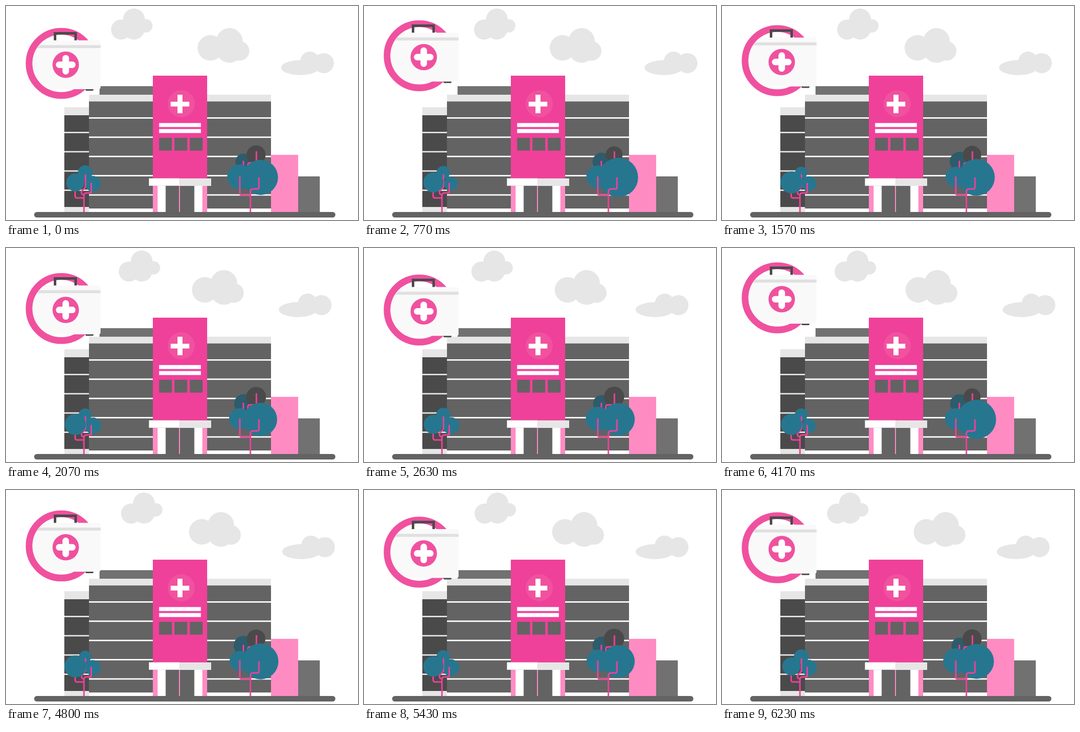
These frames come from a looping animation (700x427 px, 6260 ms). An HTML page:

```html
<!DOCTYPE html>
<html lang="en">
<head>
<meta charset="utf-8">
<title>Hospital</title>
<style>
html, body { margin: 0; width: 100%; height: 100%; overflow: hidden; background: #fff; }
svg { display: block; width: 100%; height: 100%; }
.pink { fill: #ef4199; }
.rose { fill: #ff8bc3; }
.grey { fill: #636363; }
.dark { fill: #4a4a4a; }
.mid { fill: #717171; }
.light { fill: #e6e6e6; }
.white { fill: #fff; }
.teal { fill: #27768f; }
.stem { fill: none; stroke: #ef4199; stroke-width: 3; stroke-linecap: round; }
</style>
</head>
<body>
<svg viewBox="0 0 700 427">
  <defs>
    <clipPath id="body">
      <circle cx="110" cy="114.5" r="57.5"/>
      <rect x="110" y="40" width="90" height="140"/>
    </clipPath>
  </defs>

  <g class="light">
    <g id="cloud1">
      <circle cx="229" cy="47" r="20"/><circle cx="254.5" cy="26.7" r="21.7"/>
      <circle cx="254.5" cy="45.5" r="21.5"/><circle cx="278" cy="39.5" r="13.3"/>
    </g>
    <g id="cloud2">
      <circle cx="406.5" cy="83.5" r="25.5"/><circle cx="444.5" cy="70.3" r="26.3"/>
      <circle cx="444.5" cy="87" r="26.3"/><circle cx="464.5" cy="89.7" r="19.5"/>
    </g>
    <g id="cloud3">
      <ellipse cx="585" cy="123" rx="38" ry="15"/>
      <circle cx="604.5" cy="110.3" r="19.3"/><circle cx="632" cy="114" r="20"/>
    </g>
  </g>

  <!-- left wing and main block -->
  <path class="light" d="M116 202h49v209h-49z"/>
  <path class="dark" d="M116 218h49v183h-49z"/>
  <path class="mid" d="M186 160h106v18H186z"/>
  <path class="grey" d="M165 190h362v214H165z"/>
  <path class="light" d="M165 177h362v13.500H165z"/>
  <g id="floors"></g>
  <path class="rose" d="M527 297h54v114h-54z"/>
  <path class="mid" d="M581 340h43v71h-43z"/>

  <!-- tower and entrance -->
  <path class="pink" d="M292 139h108v205H292z"/>
  <circle cx="348.500" cy="195" r="27" fill="#f1519f"/>
  <path class="white" d="M341 177h10v37h-10zM327.500 191h37v9.500h-37zM304.500 233.500h83v8h-83zM304.500 245.500h83v8h-83z"/>
  <path class="grey" d="M304.500 263h25.500v25.500h-25.500zM335 263h25.500v25.500h-25.500zM365.500 263h25.500v25.500h-25.500z"/>
  <path class="rose" d="M292 358h108v53H292z"/>
  <path class="white" d="M301.500 358h89v53h-89z"/>
  <path class="grey" d="M317.500 358h57v53h-57z"/>
  <path class="rose" d="M344 358h2v53h-2z"/>
  <path d="M284.500 344h61v14.500h-61z" fill="#fff" stroke="#ddd" stroke-width=".7"/>
  <path class="light" d="M345.500 344h62.500v15h-62.500z"/>

  <!-- small tree -->
  <circle id="smallTop" class="teal" cx="157.500" cy="332.500"/>
  <circle id="smallRight" class="teal" cx="172.800" cy="354.500"/>
  <path class="stem" d="M155 411V383M137.500 360V379q0 4 4 4H155M158 337V359C158 367 150 365 150 372q0 4 5 5M155 385V378q0-5 5-5h7q2.500 0 2.500-3V354"/>
  <circle id="smallLeft" class="teal" cx="138" cy="352"/>

  <!-- big tree -->
  <circle id="bigBack" cx="472.300" cy="310.500" fill="#2d5c6c"/>
  <circle id="bigDark" class="dark" cx="497.300" cy="297"/>
  <path class="stem" d="M498 291V310q0 3-3 3H485q-4 0-4 4V330M472 310V330"/>
  <circle id="bigLeft" class="teal" cx="465" cy="341"/>
  <circle id="bigRight" class="teal" cx="506" cy="342"/>
  <path class="stem" d="M486 411V371q0-6 5-6h9q3 0 3-3V343M465 341V373q0 4 4 4H486"/>

  <rect class="grey" x="56" y="411" width="599" height="11" rx="5.500"/>

  <!-- first aid kit -->
  <g id="kit">
    <circle cx="110" cy="114.500" r="64" fill="none" stroke="#f0519f" stroke-width="13.500"/>
    <path d="M97.500 69V54.500h41V69" fill="none" stroke="#4a4a4a" stroke-width="5"/>
    <path class="dark" d="M158 165h16v2q0 2-2 2h-12q-2 0-2-2z"/>
    <g clip-path="url(#body)">
      <rect x="50" y="68.500" width="138" height="97.500" rx="4" fill="#f9f9f9"/>
      <path d="M50 78h138v6H50z" fill="#e0e0e0"/>
    </g>
    <circle cx="118.800" cy="117.200" r="26.300" fill="#f0519f"/>
    <path d="M118.800 104.200v26M105.800 117.200h26" stroke="#fff" stroke-width="13" stroke-linecap="round"/>
  </g>
</svg>
<script>
const PERIOD = 3130;
const $ = id => document.getElementById(id);
const shift = (id, x, y) => $(id).setAttribute("transform", `translate(${x} ${y})`);
const radius = (id, r) => $(id).setAttribute("r", r);

const floor = (x, y, w) => `<rect class="white" x="${x}" y="${y}" width="${w}" height="2.800"/>`;
let floors = "";
for (let i = 0; i < 5; i++) {
  floors += floor(165, 222 + i * 38.4, 362);
  if (i < 4) floors += floor(116, 251 + i * 38.4, 49).replace("white", "light");
}
$("floors").innerHTML = floors;

function draw(now) {
  const a = now / PERIOD * 2 * Math.PI;
  const slow = Math.cos(a);
  const late = Math.sin(a - 0.22);

  shift("cloud1", 10 - 10 * slow, 0);
  shift("cloud2", 9.4 * Math.cos(a + 0.32) - 9, 0);
  shift("cloud3", 2 + 9.3 * late, 0);
  shift("kit", 0, -2.8 - 12.8 * late);

  radius("smallLeft", 20 - 2 * slow);
  radius("smallTop", 13.2 + 1.2 * slow);
  radius("smallRight", 15.2 - 1.6 * late);
  radius("bigLeft", 22.7 + 2.4 * slow);
  radius("bigRight", 35.7 + 3.5 * late);
  radius("bigBack", 17.8 - 1.8 * slow);
  radius("bigDark", 18.6 - 1.7 * late);
}

const start = performance.now();
function tick() {
  draw(performance.now() - start);
  requestAnimationFrame(tick);
}
tick();
</script>
</body>
</html>
```
